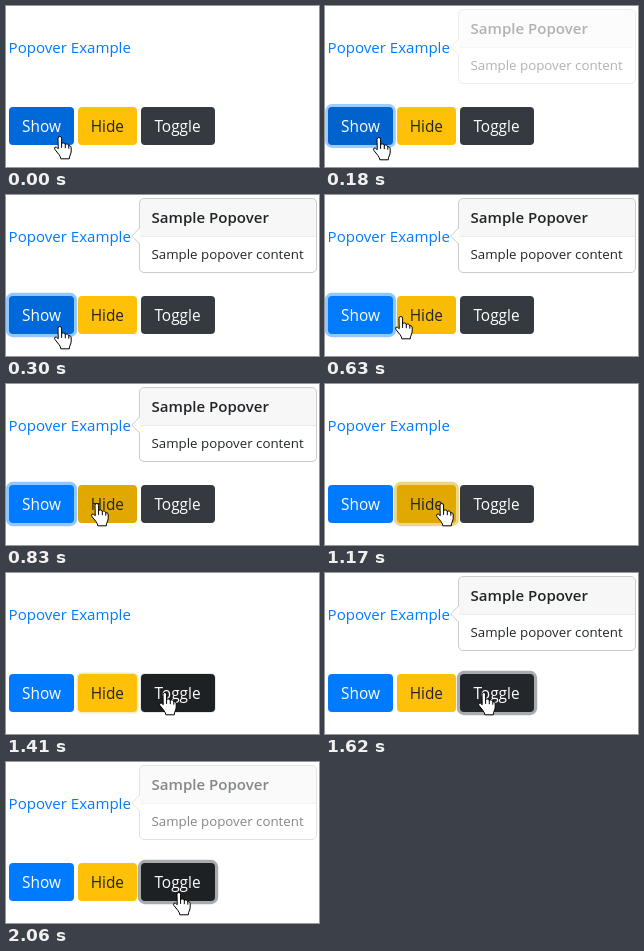
These frames come from a looping animation (313x161 px, 2180 ms). An HTML page:

```html
<!DOCTYPE html>
<html lang="en">
<head>
<meta charset="utf-8">
<title>Popover methods</title>
<style>
html, body { margin: 0; width: 100%; height: 100%; overflow: hidden; background: #fff; }
svg { display: block; width: 313px; height: 161px; }
text { font: 15.05px "Open Sans", "Noto Sans", sans-serif; fill: #212529; }
.label { font-size: 15.4px; }
.link { fill: #007bff; }
.light { fill: #fff; font-weight: 500; }
.title { font-weight: 600; }
.body { font-size: 13.3px; }
.ring { fill: none; }
.edge { fill: none; stroke: #ccc; }
</style>
</head>
<body>
<svg viewBox="0 0 313 161">
  <text class="link" x="2.6" y="47">Popover Example</text>

  <g id="show">
    <rect class="ring" x="3" y="101" width="65" height="38" rx="4" stroke="#268fff"/>
    <rect class="face" x="3" y="101" width="65" height="38" rx="4"/>
    <text class="label light" x="16" y="126">Show</text>
  </g>
  <g id="hide">
    <rect class="ring" x="72" y="101" width="59" height="38" rx="4" stroke="#deaa0c"/>
    <rect class="face" x="72" y="101" width="59" height="38" rx="4"/>
    <text class="label" x="84.7" y="126">Hide</text>
  </g>
  <g id="toggle">
    <rect class="ring" x="135" y="101" width="74" height="38" rx="4" stroke="#52585d"/>
    <rect class="face" x="135" y="101" width="74" height="38" rx="4"/>
    <text class="label light" x="148.4" y="126">Toggle</text>
  </g>

  <g id="pop">
    <rect x="133.5" y="3.5" width="177" height="74" rx="4.5" fill="#fff"/>
    <path d="M134 41V8Q134 4 138 4H306Q310 4 310 8V41Z" fill="#f7f7f7"/>
    <path d="M134 41.5H310" stroke="#ebebeb"/>
    <rect class="edge" x="133.5" y="3.5" width="177" height="74" rx="4.5"/>
    <path d="M134.2 32.8L126 41L134.2 49.2Z" fill="#fff"/>
    <path class="edge" d="M133.5 33L125.8 41L133.5 49"/>
    <text class="title" x="145.5" y="28">Sample Popover</text>
    <text class="body" x="145.5" y="64">Sample popover content</text>
  </g>

  <g id="hand" stroke="#000" stroke-linejoin="round" stroke-linecap="round">
    <path fill="#fff" d="M-2 2.2Q-2 .5 -.2 .5Q1.6 .5 1.6 2.2V7.6Q2.6 6.8 3.8 7Q5.1 7.2 5.3 8.5Q6.3 7.7 7.5 8.2Q8.6 8.6 8.8 9.8Q10 9.4 10.8 10.4Q11.2 11 11.2 12V15Q11.2 17 10.2 19Q9.3 20.6 9.3 22.8H.8Q.8 21-1 18.6L-5 13.6Q-6 11.8-5 11.2Q-3.8 10.4-2 12.4Z"/>
    <path fill="none" d="M1.6 7.6V11.5M5.3 8.5V11.8M8.8 9.8V12.3"/>
  </g>
</svg>
<script>
const LOOP = 2180, RING = 3.2;
const $ = id => document.getElementById(id);
const colors = {
  show: { rest: '#007bff', hover: '#0069d9', active: '#0062cc' },
  hide: { rest: '#ffc107', enter: '#f9bc06', hover: '#e0a800', active: '#d39e00' },
  toggle: { rest: '#343a40', hover: '#23272b', active: '#1d2124' }
};

// start ms, pointer x, y, popover opacity, button under pointer, its state, ring growth
const steps = [
  [0, 54, 130, 0, 'show', 'hover', {}],
  [80, 54, 131, 0.06, 'show', 'active', { show: 0.4 }],
  [180, 54, 131, 0.35, 'show', 'active', { show: 0.9 }],
  [300, 54, 131, 1, 'show', 'hover', { show: 1 }],
  [630, 76, 121, 1, 'hide', 'enter', { show: 1 }],
  [730, 91, 119, 1, 'hide', 'hover', { show: 1 }],
  [850, 93, 119, 0.9, 'hide', 'active', { show: 0.4, hide: 0.6 }],
  [950, 93, 119, 0.3, 'hide', 'hover', { hide: 1 }],
  [1050, 93, 119, 0, 'hide', 'hover', { hide: 1 }],
  [1170, 117, 119, 0, 'hide', 'hover', { hide: 1 }],
  [1290, 152, 119, 0, 'toggle', 'hover', { hide: 1 }],
  [1410, 159, 119, 0, 'toggle', 'active', { hide: 0.5, toggle: 0.3 }],
  [1510, 159, 119, 0.4, 'toggle', 'active', { toggle: 0.9 }],
  [1620, 159, 119, 1, 'toggle', 'hover', { toggle: 1 }],
  [1960, 173, 130, 0.95, 'toggle', 'active', { toggle: 1 }],
  [2060, 173, 130, 0.55, 'toggle', 'active', { toggle: 1 }]
];

const buttons = Object.keys(colors).map(name => ({
  name,
  face: $(name).querySelector('.face'),
  ring: $(name).querySelector('.ring')
}));
const pop = $('pop'), hand = $('hand');

function draw() {
  const time = performance.now() % LOOP;
  const [, x, y, opacity, over, state, rings] = steps.findLast(s => s[0] <= time);
  hand.setAttribute('transform', `translate(${x} ${y})`);
  pop.setAttribute('opacity', opacity);
  for (const { name, face, ring } of buttons) {
    const grown = rings[name] || 0;
    face.setAttribute('fill', colors[name][name === over ? state : 'rest']);
    // The face covers the inner half of the stroke.
    ring.setAttribute('stroke-width', 2 * RING * grown);
    ring.setAttribute('opacity', grown / 2);
  }
  requestAnimationFrame(draw);
}
draw();
</script>
</body>
</html>
```
